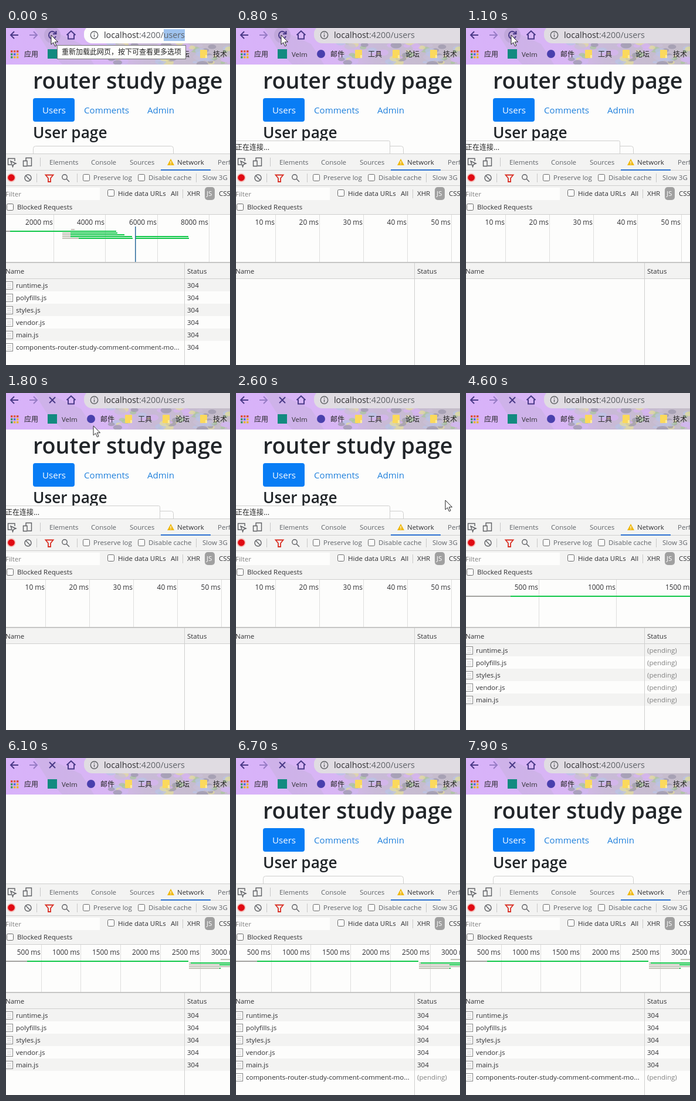
Animation of 382x572 px, one loop 8 s. Source, as an HTML page:

```html
<!DOCTYPE html>
<html lang="zh">
<head>
<meta charset="utf-8">
<title>router study page</title>
<style>
html, body { margin: 0; width: 100%; height: 100%; overflow: hidden; background: #fdfdfc; }
svg { display: block; width: 382px; height: 572px; }
text { font: 11.5px "Open Sans", "Noto Sans", "Noto Sans CJK SC", "Noto Sans CJK", sans-serif; fill: #303033; white-space: pre; }
.cjk { font: 12px "Noto Sans CJK SC", "Noto Sans CJK", sans-serif; fill: #222; }
.end { text-anchor: end; font-size: 11.9px; }
.soft { fill: #5f6368; }
.pend { fill: #808080; }
.nav { font-size: 15.1px; fill: #1f80dc; }
.url { font-size: 14.3px; }
.ico { fill: none; stroke: #606266; stroke-width: 1.4; }
.bar { fill: none; stroke: #4a3a88; stroke-width: 2; }

.a { animation: 8s step-end infinite; }
.old { animation-name: old; }
.fresh { animation-name: fresh; }
.reload { animation-name: reload; }
.stop { animation-name: stop; }
.t1 { animation-name: t1; }
.t2 { animation-name: t2; }
.t3 { animation-name: t3; }
.t4 { animation-name: t4; }
.t5 { animation-name: t5; }
.page { animation-name: page; }
.list { animation-name: list; }
.lazy { animation-name: lazy; }
.wait0 { animation-name: wait0; } .done0 { animation-name: done0; }
.wait1 { animation-name: wait1; } .done1 { animation-name: done1; }
.wait2 { animation-name: wait2; } .done2 { animation-name: done2; }
#cursor { animation: move 8s infinite; }

@keyframes old { 0% { opacity: 1 } 6.25%, 100% { opacity: 0 } }
@keyframes fresh { 0% { opacity: 0 } 6.25% { opacity: 1 } 40%, 100% { opacity: 0 } }
@keyframes reload { 0% { opacity: 1 } 20%, 100% { opacity: 0 } }
@keyframes stop { 0% { opacity: 0 } 20%, 100% { opacity: 1 } }
@keyframes t1 { 0% { opacity: 0 } 40% { opacity: 1 } 53.75%, 100% { opacity: 0 } }
@keyframes t2 { 0% { opacity: 0 } 53.75% { opacity: 1 } 62.5%, 100% { opacity: 0 } }
@keyframes t3 { 0% { opacity: 0 } 62.5% { opacity: 1 } 66.25%, 100% { opacity: 0 } }
@keyframes t4 { 0% { opacity: 0 } 66.25% { opacity: 1 } 70%, 100% { opacity: 0 } }
@keyframes t5 { 0% { opacity: 0 } 70%, 100% { opacity: 1 } }
@keyframes page { 0% { opacity: 1 } 52.5% { opacity: 0 } 77.5%, 100% { opacity: 1 } }
@keyframes list { 0% { opacity: 1 } 6.25% { opacity: 0 } 46.25%, 100% { opacity: 1 } }
@keyframes lazy { 0% { opacity: 0 } 77.5%, 100% { opacity: 1 } }
@keyframes wait0 { 0% { opacity: 0 } 46.25% { opacity: 1 } 62.5%, 100% { opacity: 0 } }
@keyframes done0 { 0% { opacity: 1 } 6.25% { opacity: 0 } 62.5%, 100% { opacity: 1 } }
@keyframes wait1 { 0% { opacity: 0 } 46.25% { opacity: 1 } 66.25%, 100% { opacity: 0 } }
@keyframes done1 { 0% { opacity: 1 } 6.25% { opacity: 0 } 66.25%, 100% { opacity: 1 } }
@keyframes wait2 { 0% { opacity: 0 } 46.25% { opacity: 1 } 70%, 100% { opacity: 0 } }
@keyframes done2 { 0% { opacity: 1 } 6.25% { opacity: 0 } 70%, 100% { opacity: 1 } }
@keyframes move {
  0%, 19% { transform: translate(77px, 12px); animation-timing-function: ease-in-out }
  29%, 35% { transform: translate(357px, 182px); animation-timing-function: ease-in }
  40%, 100% { transform: translate(392px, 240px) }
}
</style>
</head>
<body>
<svg id="stage" viewBox="0 0 382 572"></svg>
<script>
const text = (x, y, s, cls = '') => `<text x="${x}" y="${y}" class="${cls}">${s}</text>`;
const rect = (x, y, w, h, fill, more = '') => `<rect x="${x}" y="${y}" width="${w}" height="${h}" fill="${fill}" ${more}/>`;
const path = (d, more = 'class="ico"') => `<path d="${d}" ${more}/>`;
const show = (cls, body) => `<g class="a ${cls}">${body}</g>`;
const check = (x, y) => rect(x + .5, y + .5, 11, 11, PAPER, 'rx="2" stroke="#6b6b6b"');
const folder = x => rect(x, 37, 12, 14, '#fbd95c', 'rx="1"') + rect(x + 9, 46, 3, 5, '#ffeb9a');

const PANEL = '#f3f3f2', PAPER = '#fdfdfc', LINE = '#cfcfce', GREEN = '#12c84a', GREY = '#a3a3a0', PALE = '#c3c3b8';

// Paint flecks of the browser theme, denser towards the right
function flecks() {
  const tones = ['#d7b4f2', '#9c98ac', '#b9c4e6', '#e3dc9c', '#a9c79c', '#c9bfd6'];
  let seed = 7, s = '';
  const rnd = () => (seed = seed * 16807 % 2147483647) / 2147483647;
  for (let i = 0; i < 70; i++) {
    const x = 382 - 215 * rnd() ** 1.3, y = 24 + 38 * rnd(), r = 3 + 7 * rnd();
    s += `<ellipse cx="${x}" cy="${y}" rx="${r}" ry="${r * .55}" fill="${tones[i % 6]}" opacity=".75"/>`;
  }
  return s;
}

function header() {
  let dots = '';
  for (let i = 0; i < 9; i++) {
    const c = ['#d9493a', '#e0602f', '#d9493a', '#3f9a58', '#4a70d8', '#e8b32c', '#3f9a58', '#e8b32c', '#e8b32c'][i];
    dots += rect(8 + i % 3 * 5, 38 + (i / 3 | 0) * 5, 3.4, 3.4, c);
  }
  return `<defs><linearGradient id="sky"><stop offset="0" stop-color="#d8b2fa"/><stop offset=".45" stop-color="#d8b6f4"/>
    <stop offset=".62" stop-color="#c9bad8"/><stop offset="1" stop-color="#c4bdc8"/></linearGradient>
    <clipPath id="top"><rect width="382" height="62"/></clipPath></defs>` +
    `<g clip-path="url(#top)">` + rect(0, 0, 382, 62, 'url(#sky)') +
    path('M48 0L70 0L128 27L150 62L96 62L72 38Z', 'fill="#c6b2dc" opacity=".5"') + flecks() + '</g>' +
    rect(133, -4, 270, 30, '#e0dce2', 'rx="14"') + show('old', rect(133, -4, 270, 30, PAPER, 'rx="14"')) +
    path('M21 12H8M14 6L8 12L14 18', 'class="bar"') +
    path('M40 12H53M47 6L53 12L47 18', 'class="bar" opacity=".45"') +
    show('reload', `<circle cx="79" cy="12" r="14" fill="#b9a2d2" opacity=".65"/>` +
      path('M84.5 9A6.2 6.2 0 1 0 85 14M85.5 5V10H80', 'class="bar"')) +
    show('stop', path('M74 7L84 17M84 7L74 17', 'class="bar"')) +
    path('M103.5 12L111 5L118.5 12M106 11V18.5H116V11', 'class="bar"') +
    `<circle cx="150.5" cy="12" r="6.2" class="ico"/>` + path('M150.5 11V15.5M150.5 8V9.6') +
    show('old', rect(269, 2, 36, 20, '#9fc3ee')) +
    `<text x="167" y="17" class="url">localhost<tspan fill="#5f6368">:4200/users</tspan></text>` +
    dots + text(31, 49, '应用', 'cjk') +
    rect(71, 36, 16, 16, '#128a80') + text(95, 49, 'Velm') +
    `<circle cx="145" cy="44" r="7" fill="#4940ad"/>` + text(161, 49, '邮件', 'cjk') +
    folder(203) + text(225, 49, '工具', 'cjk') +
    folder(267) + text(289, 49, '论坛', 'cjk') +
    folder(331) + text(353, 49, '技术', 'cjk');
}

function page() {
  return show('page',
    `<text x="46" y="103" style="font-size:37.7px;font-weight:600;fill:#212529">router study page</text>` +
    rect(46, 119, 71, 40, '#087df5', 'rx="4"') +
    `<text x="62" y="145" class="nav" style="fill:#fff">Users</text>` +
    text(133, 145, 'Comments', 'nav') + text(241, 145, 'Admin', 'nav') +
    `<text x="46" y="187" style="font-size:26.2px;font-weight:600;fill:#212529">User page</text>` +
    rect(46.5, 200.5, 239, 36, PAPER, `rx="4" stroke="${LINE}"`));
}

function panel() {
  const rule = (y, c = LINE) => rect(0, y, 382, 1, c);
  const split = (x, y) => rect(x, y, 1, 15, '#c8c8c8');
  return rect(0, 213, 382, 104, PANEL) + rule(213) + rule(241) + rule(267) +
    path('M9 232H3.5V221.5H15V226M8 226L17 230L13 231.5L11.5 235.5Z') +
    path('M34 226V220.5H43.5V234H37M29.5 225.5H36V234.5H29.5Z') +
    split(58, 220) +
    text(74, 232, 'Elements', 'soft') + text(145, 232, 'Console', 'soft') + text(211, 232, 'Sources', 'soft') +
    path('M281 222L287 233H275Z', 'fill="#efb913"') + rect(280.4, 226, 1.2, 3.5, '#fff') + rect(280.4, 230.5, 1.2, 1.2, '#fff') +
    text(292, 232, 'Network') + text(361, 232, 'Performance', 'soft') +
    rect(264, 240, 85, 2, '#2d72d2') +
    `<circle cx="9" cy="254" r="7.5" fill="#f3bdb8"/><circle cx="9" cy="254" r="5.8" fill="#e00a12"/>
     <circle cx="37.5" cy="254.5" r="5.5" class="ico"/>` + path('M33.6 250.6L41.4 258.4') +
    split(52, 247) + path('M67.5 249.5H80.5L76 255V261H72V255Z', 'fill="none" stroke="#d93025" stroke-width="1.8"') +
    `<circle cx="100" cy="253" r="4.2" class="ico"/>` + path('M103 256L108 261') + split(121, 247) +
    check(131, 248) + text(149, 258, 'Preserve log', 'soft') +
    check(225, 248) + text(243, 258, 'Disable cache', 'soft') + split(324, 247) + text(335, 258, 'Slow 3G', 'soft') +
    rect(0, 271, 160, 21, PAPER) + text(-1, 286, 'Filter', 'pend') +
    check(173, 274) + text(191, 285, 'Hide data URLs') + text(281, 285, 'All') + split(301, 274) + text(309, 285, 'XHR') +
    rect(339, 270, 17, 22, '#a0a0a0', 'rx="5"') + `<text x="342" y="285" style="fill:#fff">JS</text>` + text(363, 285, 'CSS') +
    check(1, 298) + text(19, 308, 'Blocked Requests') +
    rect(0, 317, 382, 81, PAPER) + rule(316);
}

// Ruler with one label per step, then bars given as [x, y, width, colour]
function ruler(cls, step, ms, bars) {
  let s = '';
  for (let i = 1; i * step - 8 < 430; i++) {
    const x = Math.round(i * step - 8);
    s += rect(x, 317, 1, 80, '#dededd') + text(x - 1, 334, i * ms + ' ms', 'end');
  }
  for (const [x, y, w, c] of bars) s += rect(x, y, w, 2, c);
  return show(cls, s);
}
const firstLoad = x => [[0, 344, x, GREY], [x, 344, 382 - x, GREEN]];

function timelines() {
  const old = [[0, 344, 7, GREY], [7, 344, 181, GREEN], [111, 341, 6, PALE], [96, 347, 14, PALE], [110, 347, 80, GREEN],
    [96, 350, 14, PALE], [110, 350, 92, GREEN], [96, 353, 14, PALE], [110, 353, 105, GREEN],
    [96, 356, 28, PALE], [124, 356, 92, GREEN], [220, 353, 91, GREEN], [220, 356, 92, GREEN]];
  const last = [[0, 344, 36, GREY], [36, 344, 275, GREEN], [366, 341, 16, PALE], [312, 347, 3, PALE], [315, 347, 67, GREEN],
    [312, 350, 53, PALE], [364, 350, 18, GREEN], [312, 353, 53, PALE], [364, 353, 18, PALE], [312, 356, 53, PALE], [364, 356, 2, GREEN]];
  return ruler('old', 88.5, 2000, old) + show('old', rect(220, 337, 1.5, 60, '#2a6a9c')) +
    ruler('fresh', 75, 10, []) +
    ruler('t1', 66, 200, firstLoad(97)) +
    ruler('t2', 132, 500, firstLoad(76)) +
    ruler('t3', 100, 500, firstLoad(56)) +
    ruler('t4', 84, 500, firstLoad(45)) +
    ruler('t5', 67.7, 500, last);
}

function row(i, name) {
  const y = 426 + i * 21;
  return (i % 2 ? '' : rect(0, y, 382, 21, PANEL)) +
    rect(-.5, y + 4.5, 12, 13, PAPER, 'stroke="#8a8a8a"') +
    path(`M2 ${y + 8.5}H9M2 ${y + 11.5}H9M2 ${y + 14.5}H9`, 'stroke="#d0d0d0"') +
    text(17, y + 15, name);
}

function table() {
  const names = ['runtime.js', 'polyfills.js', 'styles.js', 'vendor.js', 'main.js'];
  const order = [0, 1, 2, 2, 2];
  let s = rect(0, 399, 382, 27, PANEL) + rect(0, 397, 382, 2, '#c6c6c5') + rect(0, 425, 382, 1, LINE) +
    text(-1, 417, 'Name') + text(309, 417, 'Status');
  s += show('list', names.map((n, i) => row(i, n)).join(''));
  names.forEach((n, i) => {
    const y = 441 + i * 21;
    s += show('wait' + order[i], text(309, y, '(pending)', 'pend')) + show('done' + order[i], text(309, y, '304'));
  });
  const lazy = row(5, 'components-router-study-comment-comment-mo...');
  s += show('old', lazy + text(309, 546, '304')) + show('lazy', lazy + text(309, 546, '(pending)', 'pend'));
  return s + rect(304, 399, 1, 173, LINE);
}

const bubble = show('fresh', rect(-4.5, 191.5, 267, 24, PAPER, `rx="2" stroke="${LINE}"`) + text(-1, 207, '正在连接...', 'cjk'));
const tip = show('old', rect(87.5, 29.5, 219, 23, '#fefefc', 'stroke="#777"') + text(95, 45, '重新加载此网页，按下可查看更多选项', 'cjk'));
const cursor = `<g id="cursor">${path('M0 0V16L3.7 12.6L6.4 18.8L9 17.7L6.3 11.7H11.5Z', 'fill="#fff" stroke="#222"')}</g>`;

document.getElementById('stage').innerHTML =
  rect(0, 0, 382, 572, PAPER) + header() + page() + bubble + panel() + timelines() + table() + tip + cursor;
</script>
</body>
</html>
```
